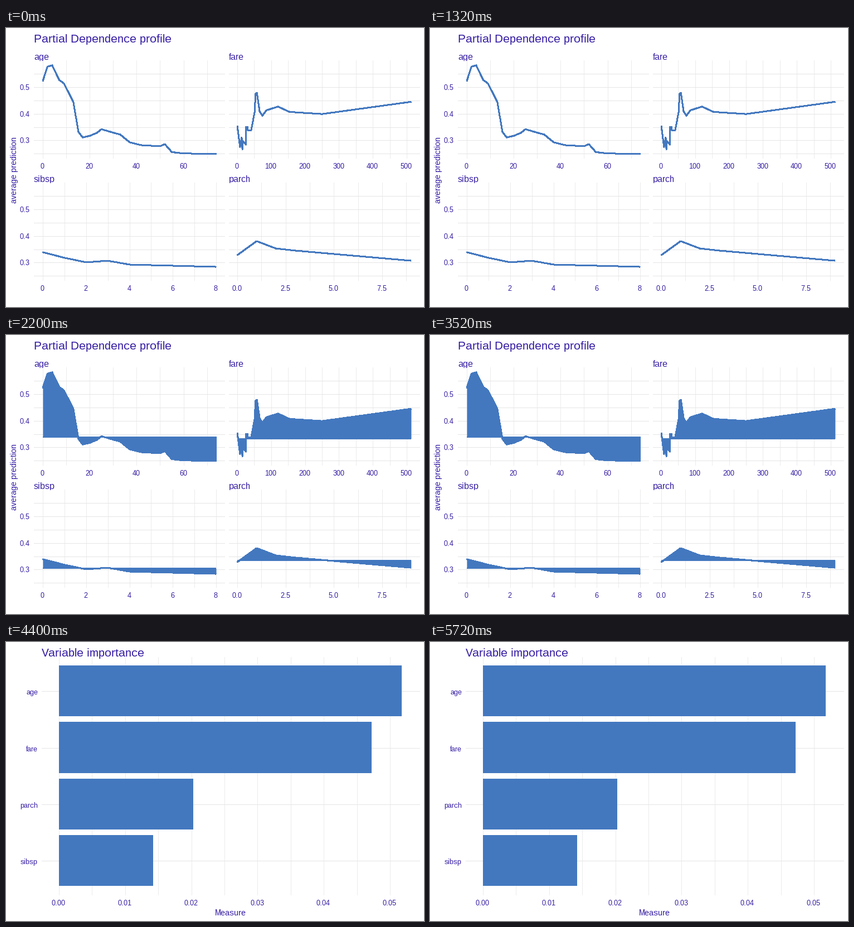
Write a matplotlib script that moves like this. It is 750 by 500 pixels and loops after 6600 ms.

```python
import matplotlib.pyplot as plt
from matplotlib.animation import FuncAnimation
from matplotlib.patches import Rectangle

W, H, DPI = 750, 500, 100
PX = 72 / DPI  # one pixel in points
BLUE, INK = "#4378bf", "#371ea3"
GRID_X, GRID_Y = "#ebebeb", "#e5e5e5"
TITLE, STRIP, AXIS, TICK = 21, 16, 15, 13  # text sizes in pixels
PANEL_W, PANEL_H = 342, 175

plt.rcParams.update({"font.family": "Liberation Sans",
                     "text.hinting": "default", "text.hinting_factor": 1})

# Each profile: left, top, x of zero, pixels per unit, tick step, tick count,
# tick format, mean prediction, key points (variable, prediction)
PROFILES = {
    "age": (50, 58, 66, 4.21, 20, 4, "{:.0f}", 0.3386,
            [(0, .523), (2, .577), (4, .582), (7, .527), (9, .514),
             (13, .445), (15.2, .332), (17, .311), (20, .317), (23, .328),
             (25, .342), (30, .329), (33, .322), (37, .293), (42, .282),
             (50, .278), (52, .286), (55, .256), (60, .251), (74, .249)]),
    "fare": (400, 58, 415, 0.608, 100, 6, "{:.0f}", 0.3333,
             [(0, .355), (8, .275), (13, .311), (15, .267), (16, .297),
              (26, .284), (26, .351), (31, .351), (31, .338), (41, .338),
              (51, .405), (54, .474), (58, .479), (66, .408), (74, .393),
              (86, .413), (120, .427), (154, .407), (250, .399),
              (513, .445)]),
    "sibsp": (50, 277, 66, 38.875, 2, 5, "{:.0f}", 0.304,
              [(0, .339), (1, .318), (2, .301), (3, .307), (4, .2925),
               (8, .284)]),
    "parch": (400, 277, 415, 34.64, 2.5, 4, "{:.1f}", 0.3354,
              [(0, .328), (1, .3805), (2, .353), (3, .345), (9, .307)]),
}
IMPORTANCE = {"age": 0.0518, "fare": 0.0472, "parch": 0.0203, "sibsp": 0.0142}

fig = plt.figure(figsize=(W / DPI, H / DPI), dpi=DPI, facecolor="white")
ax = fig.add_axes([0, 0, 1, 1])


def text(x, y, s, size, ha="left", **kw):
    return ax.text(x, y, s, fontsize=size * PX, color=INK, ha=ha, **kw)


def line(xs, ys, color=BLUE, width=2, layer=3):
    ax.plot(xs, ys, color=color, lw=width * PX, zorder=layer,
            solid_capstyle="butt", solid_joinstyle="round",
            antialiased=False)


def vgrid(first, step, count, right, top, bottom):
    """Vertical lines at each tick and halfway between ticks."""
    for i in range(2 * count):
        x = round(first + i * step / 2)
        if x < right:
            line([x, x], [top, bottom], GRID_X, 1, 1)


def hgrid(left, right, y):
    line([left, right], [round(y)] * 2, GRID_Y, 1, 1)


def draw_panel(name, filled):
    left, top, zero, unit, step, count, form, mean, points = PROFILES[name]
    right, bottom = left + PANEL_W, top + PANEL_H

    def level(v):
        return top + 48 + (0.5 - v) * 477

    vgrid(zero, step * unit, count, right, top, bottom)
    for i in range(7):
        hgrid(left, right, level(0.55 - 0.05 * i))

    strip = text(left, top - 1, name, STRIP, clip_on=True)
    strip.set_clip_path(Rectangle((left, top - 20), PANEL_W, 21,
                                  transform=ax.transData))
    for i in range(count):
        text(zero + i * step * unit - 0.7, bottom + 19,
             form.format(i * step), TICK, "center")
    if left == 50:
        for v in (0.5, 0.4, 0.3):
            text(43, level(v) + 5, f"{v}", TICK, "right")

    xs = [zero + unit * x for x, _ in points]
    ys = [level(v) for _, v in points]
    if filled:
        base = level(mean)
        ax.fill_between(xs, ys, base, color=BLUE, lw=0, zorder=2,
                        antialiased=False)
        line([xs[0], xs[-1]], [base, base])
    line(xs, ys)


def draw_profiles(filled):
    text(50, 26, "Partial Dependence profile", TITLE)
    text(15, 254, "average prediction", AXIS, "center", va="center",
         rotation=90)
    for name in PROFILES:
        draw_panel(name, filled)


def draw_importance():
    zero, unit, pitch = 95, 11880, 101.4
    vgrid(zero, unit / 100, 6, 742, 27, 453)
    for i, (name, value) in enumerate(IMPORTANCE.items()):
        mid = 88.2 + pitch * i
        hgrid(64, 742, mid)
        ax.add_patch(Rectangle((zero, mid - 46.2), value * unit, pitch * 0.9,
                               facecolor=BLUE, lw=0, zorder=2))
        text(57, mid + 6, name, TICK, "right")
    for i in range(6):
        text(zero + i * unit / 100 - 0.7, 472, f"{i / 100:.2f}", TICK,
             "center")
    text(403, 490, "Measure", AXIS, "center")
    text(64, 26, "Variable importance", TITLE)


def draw(i):
    ax.clear()
    ax.set_xlim(0, W)
    ax.set_ylim(H, 0)
    ax.axis("off")
    if i < 2:
        draw_profiles(filled=i == 1)
    else:
        draw_importance()
    return []


anim = FuncAnimation(fig, draw, frames=3, interval=2200, repeat=True,
                     repeat_delay=0)
plt.show()
```
